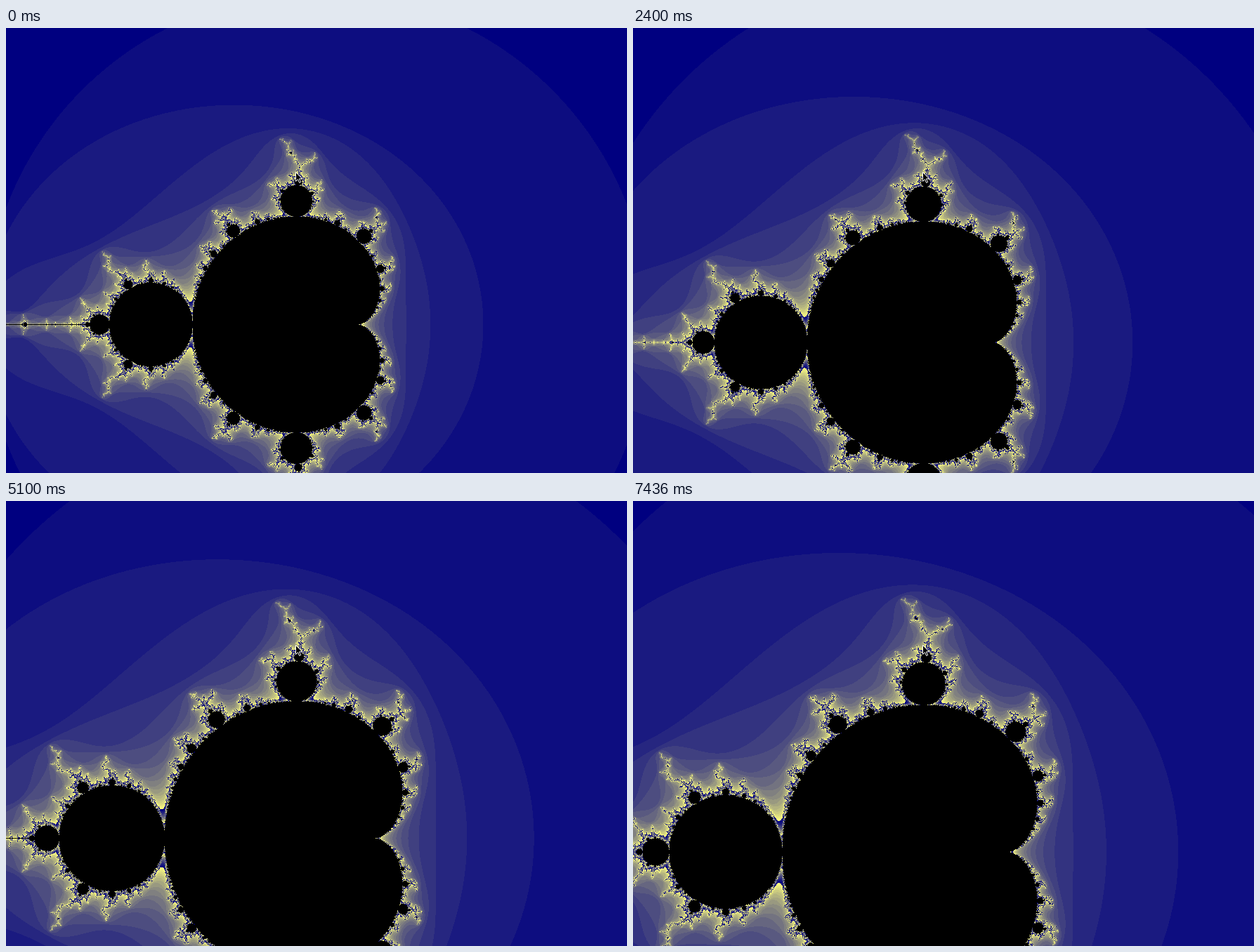
Recreate the animation shown at these times as an HTML page with a canvas. Size 884 by 634 pixels, loop 8000 ms.

```html
<!DOCTYPE html>
<html lang="en">
<head>
<meta charset="utf-8">
<title>Mandelbrot zoom</title>
<style>
  html, body { margin: 0; width: 100%; height: 100%; overflow: hidden; background: #000080; }
  canvas { display: block; }
</style>
</head>
<body>
<canvas id="stage" width="884" height="634"></canvas>
<script>
const W = 884, H = 634, LOOP = 8000;
const LIMIT = 300, SHADES = 21;

// Each step begins at its time and narrows the view by a fixed amount.
const starts = [0, 1350, 2400, 3750, 5100, 6590];
const axes = [422, 434.5, 447.5, 463, 480, 499.5];
const WIDTH = 3.738, SHRINK = 0.1986;
const focus = { x: 411.5, re: -0.131 };

const ctx = document.getElementById('stage').getContext('2d');

const palette = Array.from({ length: SHADES }, (_, i) => {
  const v = Math.round(255 * i / (SHADES - 1));
  return (255 << 24 | 128 << 16 | v << 8 | v) >>> 0;
});
const BLACK = (255 << 24) >>> 0;

// Main cardioid and period-2 disc need no iteration.
function inBody(x, y2) {
  const u = x - 0.25, q = u * u + y2;
  return q * (q + u) <= y2 / 4 || (x + 1) * (x + 1) + y2 <= 0.0625;
}

function shade(cx, cy) {
  if (inBody(cx, cy * cy)) return BLACK;
  let x = cx, y = cy;
  for (let n = 0; n < LIMIT; n++) {
    const xx = x * x, yy = y * y;
    if (xx + yy > 4) return palette[n % SHADES];
    y = 2 * x * y + cy;
    x = xx - yy + cx;
  }
  return BLACK;
}

function drawCursor(c) {
  const pts = [[0, 0], [0, 13], [3, 10.2], [5.2, 15], [7.2, 14], [5, 9.4], [9, 9.2]];
  c.beginPath();
  pts.forEach(([x, y]) => c.lineTo(412.5 + x, 205.5 + y));
  c.closePath();
  c.fillStyle = '#000';
  c.fill();
  c.strokeStyle = '#fff';
  c.lineWidth = 1;
  c.stroke();
}

function render(step) {
  const layer = document.createElement('canvas');
  layer.width = W;
  layer.height = H;
  const c = layer.getContext('2d');
  const img = c.createImageData(W, H);
  const px = new Uint32Array(img.data.buffer);
  const unit = (WIDTH - SHRINK * step) / W;
  for (let j = 0, k = 0; j < H; j++) {
    const cy = (axes[step] - j) * unit;
    for (let i = 0; i < W; i++) px[k++] = shade(focus.re + (i - focus.x) * unit, cy);
  }
  c.putImageData(img, 0, 0);
  drawCursor(c);
  return layer;
}

const views = starts.map((_, step) => render(step));
let shown = -1;

function update(ms) {
  const t = ms % LOOP;
  let step = starts.length - 1;
  while (starts[step] > t) step--;
  if (step !== shown) ctx.drawImage(views[shown = step], 0, 0);
}

const origin = performance.now();
function tick() {
  update(performance.now() - origin);
  requestAnimationFrame(tick);
}
tick();
</script>
</body>
</html>
```
